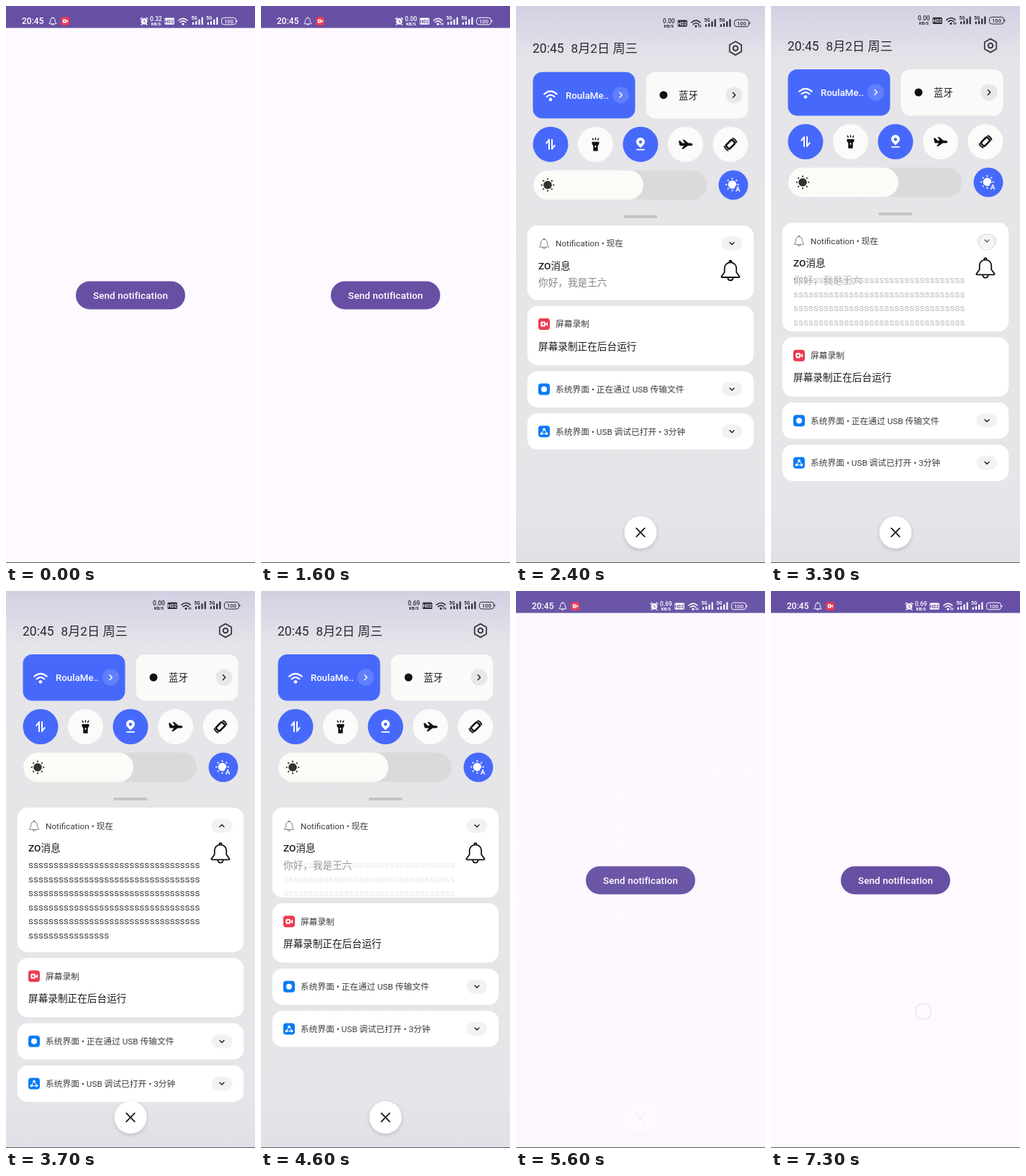
These frames come from a looping animation (346 px wide and 774 px high, 7400 ms). An HTML page:

```html
<!DOCTYPE html>
<html lang="zh">
<head>
<meta charset="utf-8">
<title>Notification demo</title>
<style>
  html, body { margin: 0; width: 100%; height: 100%; overflow: hidden; background: #fef9fe; }
  svg { display: block; }
  text { font-family: Roboto, "Noto Sans CJK SC", "Noto Sans CJK", sans-serif; fill: currentColor; white-space: pre; }
  .line { fill: none; stroke: currentColor; stroke-linecap: round; stroke-linejoin: round; }
  .fill { fill: currentColor; }
  .mid { font-weight: 500; }
</style>
</head>
<body>
<svg id="stage" width="100%" height="100%" viewBox="0 0 346 774"></svg>
<script>
const LOOP = 7400, TICK = 100;
const BLUE = '#4769fb', PURPLE = '#6750a4', INK = '#1c1c1e';
const CARD_X = 15.5, CARD_W = 315, GAP = 8;
const stage = document.getElementById('stage');
const $ = id => document.getElementById(id);
const clamp = v => Math.max(0, Math.min(1, v));
const easeOut = v => 1 - (1 - clamp(v)) ** 3;

// --- drawing helpers ---
const at = (x, y, body, color = INK, extra = '') =>
  `<g transform="translate(${x} ${y}) ${extra}" color="${color}">${body}</g>`;
const label = (x, y, size, str, color = INK, attrs = '') =>
  `<text x="${x}" y="${y}" font-size="${size}" color="${color}" ${attrs}>${str}</text>`;
const line = (d, width) => `<path class="line" d="${d}" stroke-width="${width}"/>`;
const disc = (x, y, r, color) => `<circle cx="${x}" cy="${y}" r="${r}" fill="${color}"/>`;
const box = (x, y, w, h, r, color, attrs = '') =>
  `<rect x="${x}" y="${y}" width="${w}" height="${h}" rx="${r}" fill="${color}" ${attrs}/>`;

const bell = (scale, width) => `<g transform="scale(${scale}) translate(-12 -12)">` +
  line('M12 3A6.6 6.6 0 0 0 5.4 9.6V14L2 18.6Q1.6 19.6 2.8 19.6H21.2Q22.4 19.6 22 18.6L18.6 14V9.6A6.6 6.6 0 0 0 12 3ZM10.6 2.6Q10.8 1 12 1T13.4 2.6M9 20.2Q9.4 23 12 23T15 20.2', width) + '</g>';

const wifi = width =>
  line('M-6-1.6Q0-7 6-1.6M-3.7 .9Q0-2.4 3.7 .9', width) + '<circle class="fill" cy="3.6" r="1.6"/>';

const camera = size => at(0, 0,
  box(-size / 2, -size / 2, size, size, size * .23, '#ee3a52') +
  box(-size * .29, -size * .22, size * .42, size * .44, size * .1, '#fff') +
  `<path d="M${size * .12} 0L${size * .32} ${-size * .18}V${size * .18}Z" fill="#fff"/>` +
  disc(-size * .08, 0, size * .09, '#ee3a52'));

const rays = (r1, r2, width) => {
  let d = '';
  for (let i = 0; i < 8; i++) {
    const a = i * Math.PI / 4, c = Math.cos(a), s = Math.sin(a);
    d += `M${c * r1} ${s * r1}L${c * r2} ${s * r2}`;
  }
  return line(d, width);
};
const sun = '<circle class="fill" r="5.8"/>' + rays(8.1, 8.4, 2);

const chevron = d => line(d, 1.4);
const RIGHT = 'M-1.6-3.4L1.8 0L-1.6 3.4', DOWN = 'M-3-1.4L0 1.6L3-1.4', UP = 'M-3 1.4L0-1.6L3 1.4';

const signal = x => label(x - 8.4, 19.4, 6.4, '5G', 'currentColor', 'font-weight="700"') +
  [3.6, 5, 7.6, 10.6].map((h, i) => box(x - 7 + i * 4.2, 26 - h, 2.2, h, .6, 'currentColor')).join('');

const statusIcons = (color, back) => `<g color="${color}">` +
  label(208.5, 20.8, 8.5, '', 'currentColor', 'class="mid speed" text-anchor="middle"') +
  label(208.5, 26.8, 6, 'KB/S', 'currentColor', 'font-weight="700" text-anchor="middle"') +
  box(220.5, 16.6, 13.5, 9.2, 1.6, 'currentColor') +
  label(227.2, 23.7, 6.6, 'HD2', back, 'font-weight="700" text-anchor="middle"') +
  at(246, 21.6, wifi(1.6) + `<g class="arrows">${line('M4.4 2.2V4.4M6.6 2.2V4.4', 1.2)}</g>`, 'currentColor') +
  signal(266) + signal(286.7) +
  box(299.5, 16.2, 20, 9.6, 3.4, 'none', 'stroke="currentColor" stroke-width="1"') +
  box(320.4, 19.4, 1, 3.2, .5, 'currentColor') +
  label(309.5, 23.8, 7.6, '100', 'currentColor', 'class="mid" text-anchor="middle"') + '</g>';

// --- app screen ---
const alarm = '<circle class="fill" cy=".4" r="4.4"/>' +
  line('M-5-3L-3-4.8M5-3L3-4.8M-3 4.2L-4 5.2M3 4.2L4 5.2', 1.3) +
  `<path d="M0-2V.8L2 2" fill="none" stroke="${PURPLE}"/>`;

const app =
  box(0, 0, 346, 774, 0, '#fef9fe') + box(0, 0, 346, 30.5, 0, PURPLE) +
  label(22, 25.3, 12, '20:45', '#fff', 'class="mid"') +
  at(65, 21, `<g id="bell">${bell(.5, 1.9)}</g>`, '#fff') +
  at(82.2, 21, camera(11.6)) + at(192, 21, alarm, '#fff') +
  statusIcons('#fff', PURPLE) +
  box(97, 382.5, 152, 39, 19.5, PURPLE) +
  '<circle id="ripple" cx="186" cy="404" fill="#fff" clip-path="url(#button)"/>' +
  label(173, 407.2, 13.45, 'Send notification', '#fff', 'class="mid" letter-spacing=".1" text-anchor="middle"');

// --- quick settings ---
const dataIcon = line('M-2 6.5V-6.5L-5.6-1.6M2-6.5V6.5L5.6 1.6', 2);
const torch = '<path class="fill" d="M-5-3.4H5V-.6L3.2 2V9.2H-3.2V2L-5-.6Z"/>' +
  line('M0-8.6V-6.4M-4.2-8L-3.2-6.2M4.2-8L3.2-6.2', 1.5) + box(-.8, 1.6, 1.6, 3, .8, '#fff');
const pin = '<path class="fill" d="M0 5C-4 1-6-.8-6-3.4A6 6 0 0 1 6-3.4C6-.8 4 1 0 5Z"/>' +
  disc(0, -3.2, 2.2, BLUE) + line('M-5 7.4H5', 1.8);
const plane = '<path class="fill" d="M-9.5-5h2.2l3.2 3.4h3L-4-6.5h2.2l6 4.9h3.2q2.6.3 2.6 1.9T7.2 2H3.2L-3 6.5h-2.4L-2.4 2h-4.2q-1.4 0-1.8-1.5z"/>';
const rotate = '<g transform="rotate(45)">' + box(-3.6, -6, 7.2, 12, 1.6, 'none', 'stroke="currentColor" stroke-width="2.6"') + '</g>' +
  line('M3.4-8.4A9 9 0 0 1 8.6-2.8M-3.4 8.4A9 9 0 0 1-8.6 2.8', 1.7);

const toggles = [[dataIcon, 1], [torch, 0], [pin, 1], [plane, 0], [rotate, 0]].map(([icon, on], i) =>
  at(48 + i * 62.5, 188.5, disc(0, 0, 24.5, on ? BLUE : '#fbfbfa') + icon, on ? '#fff' : '#111')).join('');

const quick =
  at(4, -.8, statusIcons('#2b2b33', '#dddbe7')) +
  label(23, 61.6, 17.5, '20:45', '#29292d') + label(76.5, 61.6, 17.2, '8月2日 周三', '#29292d') +
  at(305, 55, line('M0-9.4L8.2-4.7V4.7L0 9.4L-8.2 4.7V-4.7Z', 1.8) +
    '<circle class="line" r="3.3" stroke-width="2"/>', '#3a3a3f') +
  box(23.5, 88, 142, 64.5, 13, BLUE) + at(48, 121, wifi(1.5), '#fff', 'scale(1.45)') +
  label(69, 125, 13.3, 'RoulaMe..', '#fff', 'class="mid"') +
  at(145.5, 120, '<circle r="11.5" fill="#fff" opacity=".15"/>' + chevron(RIGHT), '#fff') +
  box(180.5, 88, 142, 64.5, 13, '#fafaf9') + disc(205, 120, 5.5, '#111') +
  label(226, 125, 13.4, '蓝牙', INK, 'class="mid"') +
  at(303, 120, disc(0, 0, 11.5, '#e8e8e9') + chevron(RIGHT)) +
  toggles +
  box(24, 224.5, 241, 41, 20.5, '#dadadb') +
  '<path d="M44.5 224.5H177V265.5H44.5A20.5 20.5 0 0 1 44.5 224.5Z" fill="#fbfbf7"/>' +
  '<path d="M160 224.5H156.5A20.5 20.5 0 0 1 156.5 265.5H178V224.5Z" fill="#dadadb"/>' +
  at(44, 245, sun, '#333') +
  disc(302, 245, 20.5, BLUE) + at(300.5, 244.5, sun, '#fff') +
  box(304, 246, 9, 9, 3, BLUE) + label(305, 254.6, 9.5, 'A', '#fff', 'font-weight="700"') +
  box(149.5, 287, 47, 4, 2, '#c3c3c6');

// --- notification cards, in card-local y ---
const heading = str => label(55, 29.7, 11.75, str, '#3c3c40');
const pill = (d, id = '') => at(300, 25.3,
  box(-14.5, -9.7, 29, 19.4, 9.7, '#f2f2f4') + `<path ${id} class="line" d="${d}" stroke-width="1.4"/>`);
const badge = icon => at(39, 25.3, box(-8, -8, 16, 16, 4, '#0a7cf5') + icon, '#fff');
const nodes = line('M0-3L-3.6 3H3.6Z', 1) + disc(0, -3, 1.8, '#fff') + disc(-3.6, 3, 1.8, '#fff') + disc(3.6, 3, 1.8, '#fff');
const longText = [34, 34, 34, 34, 34, 16].map((n, i) =>
  label(31, 84 + i * 19.6, 13.6, 's'.repeat(n), '#444')).join('');

const cards = [
  { h: 104, body: at(39, 25.3, bell(.66, 1.3), '#66666a') + heading('Notification • 现在') +
      pill(DOWN, 'id="fold"') + label(31, 61, 13.6, 'ZO消息', INK, 'class="mid"') +
      `<g id="short">${label(31, 84.8, 13.65, '你好，我是王六', '#85858a')}</g><g id="long">${longText}</g>` +
      at(298, 62.8, bell(1.25, 1.45), '#111') },
  { h: 82.5, body: at(39, 25.3, camera(16)) + heading('屏幕录制') +
      label(31, 61, 13.65, '屏幕录制正在后台运行', INK, 'class="mid"') },
  { h: 50.7, body: badge(disc(0, 0, 4, '#fff')) + heading('系统界面 • 正在通过 USB 传输文件') + pill(DOWN) },
  { h: 50.7, body: badge(nodes) + heading('系统界面 • USB 调试已打开 • 3分钟') + pill(DOWN) },
];
const cardMarkup = cards.map(({ body }, i) =>
  `<svg id="card${i}" x="${CARD_X}" width="${CARD_W}" overflow="hidden">` +
  `<rect id="face${i}" width="${CARD_W}" rx="15" fill="#fff"/>` + at(-CARD_X, 0, body) + '</svg>').join('');

const closeButton =
  '<circle cx="173" cy="733.5" r="23" fill="#55556a" opacity=".22" filter="url(#soft)"/>' +
  disc(173, 731.5, 22.5, '#fff') + at(173, 731.5, line('M-5.8-5.8L5.8 5.8M5.8-5.8L-5.8 5.8', 1.7), '#111');

const stops = [[0, '#d3cfe2'], [.045, '#dcd9e7'], [.1, '#e5e4e9'], [.5, '#e6e6e8'], [.9, '#e6e5e9'], [1, '#e1e0e7']]
  .map(([o, c]) => `<stop offset="${o}" stop-color="${c}"/>`).join('');

stage.innerHTML =
  `<defs><linearGradient id="haze" x2="0" y2="1">${stops}</linearGradient>
  <clipPath id="button">${box(97, 382.5, 152, 39, 19.5, '#000')}</clipPath>
  <filter id="soft" x="-30%" y="-30%" width="160%" height="160%"><feGaussianBlur stdDeviation="2.5"/></filter></defs>` +
  app +
  `<g id="shade">${box(0, 0, 346, 774, 0, 'url(#haze)')}<g id="panel">${quick}</g>${cardMarkup}${closeButton}</g>` +
  '<circle id="dot" r="11" fill="#fbfaff" fill-opacity=".85" stroke="#b9b7d3" stroke-width="1.2"/>' +
  box(0, 773, 346, 1, 0, '#5d5a60');

// --- timeline ---
// Touches: start, end, from x, y, to x, y
const touches = [
  [1000, 1300, 186, 404, 186, 404],
  [2100, 2400, 215, 60, 205, 330],
  [3200, 3400, 300, 328, 300, 328],
  [4400, 4600, 300, 328, 300, 328],
  [5200, 5400, 248, 565, 236, 330],
  [5900, 6100, 76, 579, 76, 579],
  [7100, 7400, 211.5, 584, 211.5, 584],
];

function shadeState(t) {
  if (t < 2200 || t >= 5700) return { alpha: 0, shift: 0, limit: 774 };
  if (t < 5200) {
    const shift = t < 2300 ? -60 : 3.7 * Math.exp((2400 - t) / 110);
    return { alpha: clamp((t - 2100) / 200), shift: t >= 2800 ? 0 : shift, limit: 774 };
  }
  const u = (t - 5200) / 500;
  return { alpha: (1 - u) ** 2, shift: -35.5 - 300 * u, limit: 534 - 900 * u };
}

function drawTouch(t) {
  const touch = touches.find(([from, to]) => t >= from && t < to);
  $('dot').style.display = touch ? '' : 'none';
  if (!touch) return;
  const [from, to, x0, y0, x1, y1] = touch, k = (t - from) / (to - from);
  $('dot').setAttribute('cx', x0 + (x1 - x0) * k);
  $('dot').setAttribute('cy', y0 + (y1 - y0) * k);
  $('dot').setAttribute('opacity', t >= to - TICK ? .35 : 1);
}

function drawCards(open, shift, limit) {
  let top = 301 + shift;
  cards.forEach(({ h }, i) => {
    const full = h + (i ? 0 : 97 * open);
    const shown = Math.max(0, Math.min(full, limit - top));
    $('card' + i).setAttribute('y', top);
    $('card' + i).setAttribute('height', shown);
    $('face' + i).setAttribute('height', shown);
    top += full + GAP;
  });
  $('short').setAttribute('opacity', 1 - open);
  $('long').setAttribute('opacity', open ** 1.5);
  $('fold').setAttribute('d', open > .5 ? UP : DOWN);
}

function draw(t) {
  const { alpha, shift, limit } = shadeState(t);
  $('shade').style.display = alpha ? '' : 'none';
  $('shade').setAttribute('opacity', alpha);
  $('panel').setAttribute('transform', `translate(0 ${shift})`);
  drawCards(easeOut((t - 3200) / 500) - easeOut((t - 4400) / 500), shift, limit);

  const speed = t < 1200 ? '0.32' : t < 4200 ? '0.00' : '0.69';
  stage.querySelectorAll('.speed').forEach(el => el.textContent = speed);
  stage.querySelectorAll('.arrows').forEach(el => el.setAttribute('opacity', t < 1200 ? 0 : 1));

  const pressed = t >= 1000 && t < 1500;
  $('ripple').setAttribute('r', pressed ? 30 + 100 * easeOut((t - 1000) / 300) : 0);
  $('ripple').setAttribute('opacity', .16 * (1 - clamp((t - 1200) / 300)));
  $('bell').setAttribute('opacity', t >= 1300 && t < 1800 ? .75 + .25 * (t - 1300) / 500 : 1);
  drawTouch(t);
}

const start = performance.now();
function frame() {
  const t = (performance.now() - start) % LOOP;
  draw(Math.floor(t / TICK) * TICK);
  requestAnimationFrame(frame);
}
frame();
</script>
</body>
</html>
```
